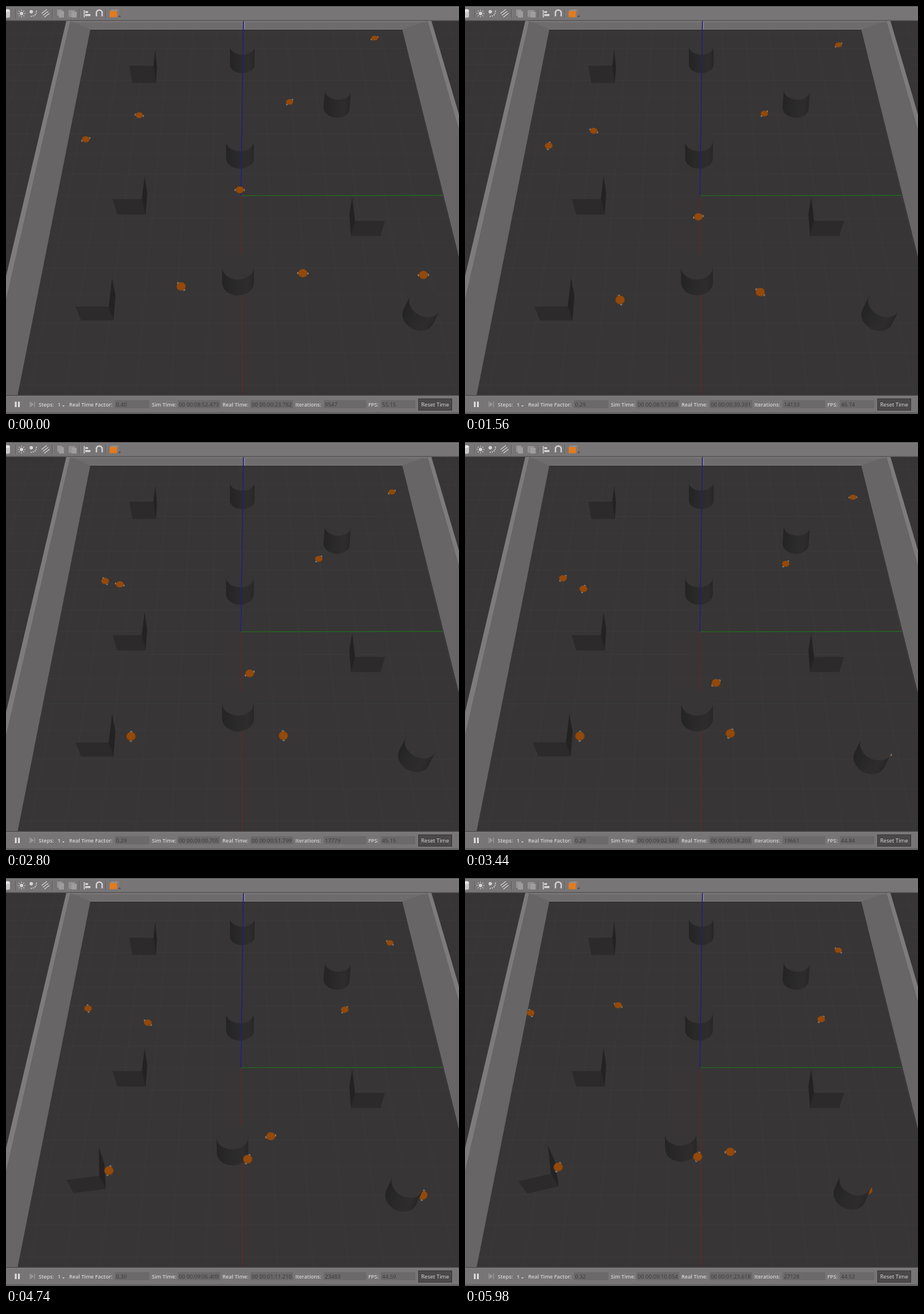
These frames come from a looping animation (789 px wide and 710 px high, 6 s). An HTML page with a canvas:

```html
<!DOCTYPE html>
<html lang="en">
<head>
<meta charset="utf-8">
<title>Robot arena</title>
<style>
html, body { margin: 0; width: 100%; height: 100%; overflow: hidden; background: #373536; }
canvas { display: block; width: 789px; height: 710px; }
</style>
</head>
<body>
<canvas id="stage" width="789" height="710"></canvas>
<script>
const g = document.getElementById('stage').getContext('2d');
const W = 789, H = 710, TOP = 26, BOTTOM = 677, LOOP = 6000, STEP = 20;
const FLOOR = '#373536', BAR = '#777576', PALE = '#d6d4d5';
const FONT = '"Open Sans", "Noto Sans", sans-serif';
const HORIZON = -1172; // height where parallel lines on the ground meet

const ramp = (t, from, to) => Math.min(1, Math.max(0, (t - from) / (to - from)));

// Smooth curve through points that are evenly spaced over the loop.
function along(points, t) {
  const last = points.length - 1;
  const pos = t / LOOP * last;
  const i = Math.min(last - 1, Math.max(0, Math.floor(pos)));
  const u = pos - i, v = 1 - u;
  const slope = (k, c) => {
    const a = Math.max(0, k - 1), b = Math.min(last, k + 1);
    return (points[b][c] - points[a][c]) / (b - a);
  };
  return [0, 1].map(c =>
    points[i][c] * (1 + 2 * u) * v * v + points[i + 1][c] * u * u * (3 - 2 * u)
    + u * v * (slope(i, c) * v - slope(i + 1, c) * u));
}

function poly(color, ...p) {
  g.fillStyle = color;
  g.beginPath();
  for (let i = 0; i < p.length; i += 2) g.lineTo(p[i], p[i + 1]);
  g.closePath();
  g.fill();
}

function line(color, width, ...p) {
  g.strokeStyle = color;
  g.lineWidth = width;
  g.beginPath();
  for (let i = 0; i < p.length; i += 2) g.lineTo(p[i], p[i + 1]);
  g.stroke();
}

function rect(color, x, y, w, h) {
  g.fillStyle = color;
  g.fillRect(x, y, w, h);
}

function oval(color, x, y, rx, ry = rx) {
  g.fillStyle = color;
  g.beginPath();
  g.ellipse(x, y, rx, ry, 0, 0, 7);
  g.fill();
}

function text(s, x, color, weight = 600, size = 9.1) {
  g.font = `${weight} ${size}px ${FONT}`;
  g.fillStyle = color;
  g.fillText(s, x, 697);
}

// Ground line through (x, y), followed to another height.
const recede = (x, y, toY, vx) => vx + (x - vx) * (toY - HORIZON) / (y - HORIZON);

function grid() {
  for (let n = -12; n <= 12; n++) {
    const y = HORIZON + (330 - HORIZON) / (1 - 0.0257 * n);
    line('#3c3b3b', 1, 0, y, W, y);
    const x = 409 + 50.2 * n;
    line('#3c3b3b', 1, recede(x, 330, TOP, 400), TOP, recede(x, 330, BOTTOM, 400), BOTTOM);
  }
}

// Side wall between three parallel ground lines: outer rim, inner rim, foot.
function sideWall(outer, inner, foot) {
  const end = (x, y) => recede(x, y, BOTTOM, 388);
  poly('#676566', inner, TOP, foot, 40, end(foot, 40), BOTTOM, end(inner, TOP), BOTTOM);
  poly('#7d7b7c', outer, TOP, inner, TOP, end(inner, TOP), BOTTOM, end(outer, TOP), BOTTOM);
}

function walls() {
  sideWall(105, 112, 147);
  sideWall(741, 734, 690);
  poly('#6e6c6d', 112, TOP, 734, TOP, 690, 41, 147, 41);
  line('#828081', 1, 112, 27.5, 734, 27.5);
  line('#7e7c7d', 1, 147, 40.5, 690, 40.5);
}

// Open box whose far corner is at (x, y); dir tells to which side it extends.
function box(x, y, dir) {
  const w = 38 + 0.039 * y, low = y + 31.5 - 0.014 * y;
  const peak = y - 23 - 0.05 * y, skew = 4 + 0.011 * y;
  const px = d => x + dir * d;
  poly('#2c2a2b', x, y, px(w), y, px(w + skew * 0.8), low, px(skew), low);
  poly('#242324', px(w - 0.5), y, px(w + skew * 0.55), peak,
    px(w + skew * 1.15), peak + 30, px(w + skew * 0.8), low);
}

// Drum with its lid centred at (x, y); the lid has the colour of the floor.
function drum(x, y) {
  const rx = 20.3 + 0.0163 * y, ry = 13.4 + 0.019 * y, h = 33 - 0.012 * y;
  const lean = 0.00016 * (x - 408) * y;
  g.save();
  g.translate(x, y);
  g.rotate(lean * Math.PI / 180);
  const shade = g.createLinearGradient(-rx, 0, rx, 0);
  shade.addColorStop(0, '#252425');
  shade.addColorStop(0.35, '#2a292a');
  shade.addColorStop(0.8, '#2e2c2d');
  shade.addColorStop(1, '#282728');
  g.fillStyle = shade;
  g.beginPath();
  g.moveTo(rx, 0);
  g.ellipse(0, h, rx, ry, 0, 0, Math.PI);
  g.lineTo(-rx, 0);
  g.fill();
  oval(FLOOR, 0, 0, rx + 0.3, ry);
  g.restore();
}

// The wheels sit at right angles to the direction of travel.
function robot(path, t) {
  const [x, y] = along(path, t);
  const [x0, y0] = along(path, t - 10), [x1, y1] = along(path, t + 10);
  const r = 8 * (y - HORIZON) / (330 - HORIZON), flat = 0.64 + 0.00045 * y;
  const heading = Math.atan2((y1 - y0) / flat, x1 - x0);
  const wx = -Math.sin(heading) * r * 0.92;
  const wy = Math.cos(heading) * r * Math.max(0.76, flat * 0.95);
  for (const s of [-1, 1]) {
    oval('#4a4644', x + s * wx, y + s * wy + 0.7, r * 0.28);
    oval('#8a8581', x + s * wx, y + s * wy, r * 0.22);
  }
  oval('#7c410f', x, y, r * 0.92, r * flat);
  oval('#94490a', x, y - 0.2, r * 0.82, r * flat * 0.88);
}

const hiddenBot = [[727, 468], [730, 516], [733, 539], [729, 552], [701, 543]];
const robots = [
  [[642, 56], [650, 67], [674, 90], [671, 110], [650, 126]],
  [[494, 167], [549, 206], [621, 246]],
  [[232, 190], [225, 216], [198, 251], [242, 255], [267, 221]],
  [[139, 232], [145, 243], [174, 241], [148, 227], [114, 235]],
  [[407, 320], [406, 365], [428, 408], [459, 444], [462, 477]],
  [[305, 488], [272, 511], [211, 512], [183, 510], [162, 503]],
  [[517, 465], [515, 497], [477, 511], [426, 491], [405, 485]]
];

// Obstacles that the robots push along.
function pushed(t) {
  const mid = ramp(t, 4100, LOOP);
  drum(404 - 29 * mid, 454 - 10 * mid);

  const side = ramp(t, 1560, LOOP);
  drum(730 - 50 * side ** 1.5, 517 + 15 * Math.sin(2.3 * side));

  const slide = ramp(t, 3100, LOOP), turn = ramp(t, 4000, 5280);
  g.save();
  g.translate(154 - 26 * slide, 535 - 3 * slide);
  g.rotate(-13 * turn * Math.PI / 180);
  g.translate(-154, -535);
  box(121, 523, 1);
  g.restore();
}

function clock(ms) {
  const two = n => String(Math.floor(n)).padStart(2, '0');
  const s = ms / 1000;
  return `00 ${two(s / 3600)}:${two(s / 60 % 60)}:${two(s % 60)}.${String(ms % 1000).padStart(3, '0')}`;
}

function toolbar() {
  rect(BAR, 0, 0, W, TOP);
  rect('#5c5a5b', 0, 0, W, 1.5);
  rect('#838182', 0, 2, W, 1);
  rect('#5a5859', 0, 24.5, W, 1.5);
  for (const x of [17, 81, 128, 174]) {
    rect('#4c4a4b', x - 0.5, 5, 1, 16);
    rect('#8b898a', x + 0.5, 5, 1, 16);
  }
  // cylinder
  rect('#c9c7c8', 0, 8, 7, 10);
  oval('#c9c7c8', 2, 18, 5, 2.5);
  oval('#e6e4e5', 2, 8, 5, 2.5);
  // point light
  oval(PALE, 27, 13, 3);
  for (let i = 0; i < 8; i++) {
    const c = Math.cos(i * Math.PI / 4), s = Math.sin(i * Math.PI / 4);
    line(PALE, 1.1, 27 + 4.6 * c, 13 + 4.6 * s, 27 + 6.8 * c, 13 + 6.8 * s);
  }
  // spot light
  oval(PALE, 44, 10, 3);
  for (let i = 0; i < 5; i++) {
    const a = i * 0.42 - 0.1;
    oval(PALE, 44 + 9 * Math.cos(a), 10 + 8 * Math.sin(a), 1.1);
  }
  // directional light
  for (const d of [0, 4, 8]) line(PALE, 1.3, 62 + d * 0.6, 13 + d * 0.8, 71 + d * 0.6, 6 + d * 0.8);
  // copy and paste, disabled
  rect('#949293', 89, 6, 9, 11);
  rect('#9d9b9c', 92, 9, 9, 11);
  rect('#929091', 109, 7, 11, 12);
  rect('#9f9d9e', 114, 10, 9, 10);
  // align
  rect(PALE, 135.5, 7, 1.6, 13);
  rect(PALE, 138, 9, 5, 3);
  rect(PALE, 138, 14, 9, 3.5);
  // magnet
  g.strokeStyle = PALE;
  g.lineWidth = 2.4;
  g.beginPath();
  g.moveTo(157.5, 18);
  g.arc(162.5, 12, 5, Math.PI, 0);
  g.lineTo(167.5, 18);
  g.stroke();
  // view cube
  poly('#958c85', 180, 9, 184, 6, 197, 6, 193, 9);
  poly('#8a7b70', 193, 9, 197, 6, 197, 15, 193, 19.5);
  rect('#e57a1c', 180.5, 9, 12.5, 10.5);
  poly('#403e3f', 196, 17, 200, 17, 198, 19.5);
}

function statusBar(t) {
  const ticks = Math.round(t * 2.94);
  const real = 23782 + Math.round(t * 10.006);
  const factor = 0.3 + 0.1 * Math.exp(-t / 400) + 0.02 * Math.sin((t - 1700) * Math.PI / 1000) * ramp(t, 0, 900);
  const fps = 44.5 + 10.65 * Math.exp(-t / 1000);
  rect(BAR, 0, BOTTOM, W, 33);
  rect('#4e4c4d', 0, BOTTOM, W, 1.5);
  rect('#858384', 0, 679, W, 1);
  rect('#626061', 0, 707, W, 3);
  for (const x of [15.5, 21]) rect('#e2e0e1', x, 688.5, 3, 9.5);
  for (const x of [41, 49]) rect('#9c9a9b', x, 688.5, 1.3, 9.5);
  poly('#9c9a9b', 43, 689, 48.5, 693.2, 43, 697.5);
  text('Steps:', 57, PALE);
  text('1', 90, PALE);
  poly(PALE, 98, 695, 102, 695, 100, 697.5);
  const field = (label, x, fx, w, value) => {
    text(label, x, PALE);
    rect('#6b696a', fx, 686, w, 14);
    text(value, fx + 2, '#3a3839', 400, 9.5);
  };
  field('Real Time Factor:', 110, 189.5, 60, factor.toFixed(2));
  field('Sim Time:', 254, 299, 74, clock(532473 + ticks));
  field('Real Time:', 377, 426, 74, clock(real));
  field('Iterations:', 504, 553.5, 74, String(9547 + ticks));
  field('FPS:', 631, 653, 60, fps.toFixed(2));
  rect('#383637', 718, 683, 59, 21);
  rect('#4a4849', 719, 684, 57, 19);
  text('Reset Time', 723, '#dddbdc', 400, 9.5);
}

function draw(t) {
  rect(FLOOR, 0, 0, W, H);
  grid();
  walls();
  line('#6c2423', 1.2, 409, 330, 409, 432, 411, 505, 412, BOTTOM);
  line('#22691f', 1.3, 409, 330.2, 761, 329.5);

  drum(411.5, 70);
  drum(578, 147);
  drum(407.5, 235);
  box(215, 104, 1);
  box(186, 336, 1);
  box(660, 374, -1);

  robot(hiddenBot, t);
  pushed(t);

  line('#1f1e86', 1.4, 413.5, TOP, 409, 330);
  line('#8c8aa8', 1, 415.5, 27, 415.5, 40);
  for (const path of robots) robot(path, t);
  toolbar();
  statusBar(t);
}

const start = performance.now();
function tick() {
  const t = (performance.now() - start) % LOOP;
  draw(Math.floor(t / STEP) * STEP);
  requestAnimationFrame(tick);
}
tick();
</script>
</body>
</html>
```
